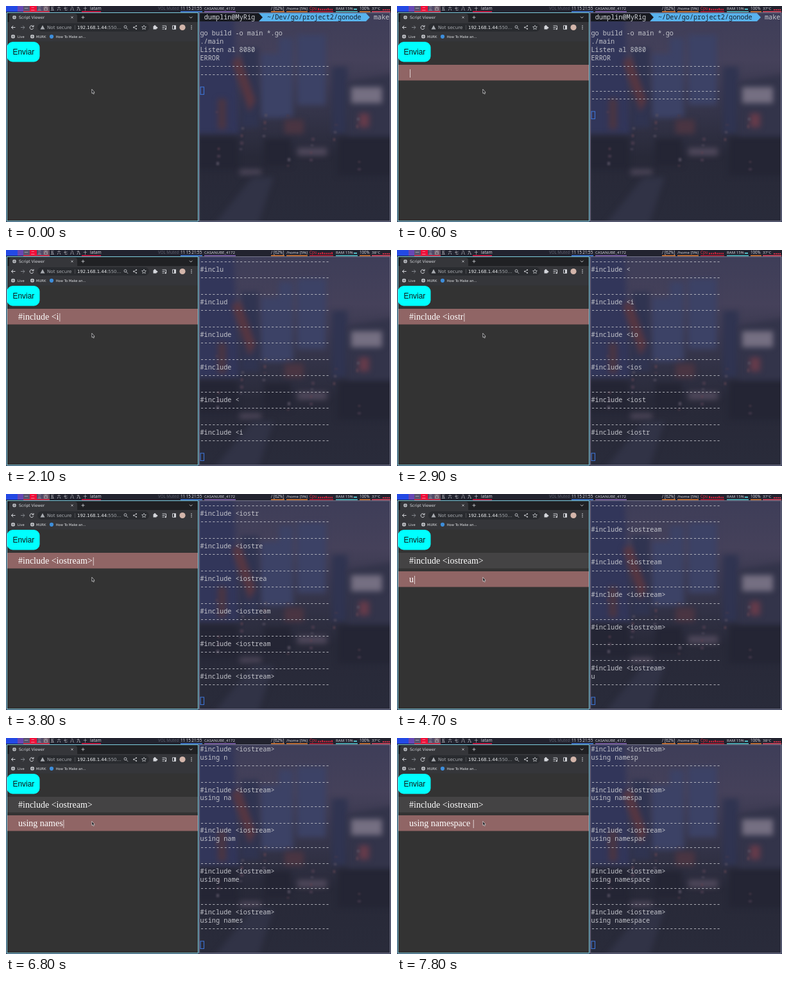
Write an HTML page with a canvas that moves like this. It is 600x338 px and loops after 8 s.

```html
<!DOCTYPE html>
<html lang="es">
<head>
<meta charset="utf-8">
<style>
html, body { margin: 0; width: 600px; height: 338px; overflow: hidden; background: #202124; }
canvas { display: block; }
</style>
</head>
<body>
<canvas id="stage" width="600" height="338"></canvas>
<script>
const LOOP = 8000, ROWS = 25, ROW_H = 12.75, LEFT = 302.5;
const MONO = '10.2px "Noto Sans Mono", "DejaVu Sans Mono", monospace';
const UI = '"DejaVu Sans", sans-serif';
const DASHES = '-'.repeat(33);
const ctx = document.getElementById('stage').getContext('2d');

// ---- drawing helpers ----
function box(x, y, w, h, color, c = ctx) {
  c.fillStyle = color;
  c.fillRect(x, y, w, h);
}
function frame(x, y, w, h, color) {
  ctx.strokeStyle = color;
  ctx.lineWidth = 1;
  ctx.strokeRect(x, y, w, h);
}
function pill(x, y, w, h, r, color) {
  ctx.fillStyle = color;
  ctx.beginPath();
  ctx.roundRect(x, y, w, h, r);
  ctx.fill();
}
function dot(x, y, r, color) {
  ctx.fillStyle = color;
  ctx.beginPath();
  ctx.arc(x, y, r, 0, 7);
  ctx.fill();
}
function text(str, x, y, font, color) {
  ctx.font = font;
  ctx.fillStyle = color;
  ctx.fillText(str, x, y);
}
function stroke(path, color, width = 1) {
  ctx.strokeStyle = color;
  ctx.lineWidth = width;
  ctx.stroke(new Path2D(path));
}
function shape(path, color, c = ctx) {
  c.fillStyle = color;
  c.fill(new Path2D(path));
}

// ---- typing script: '~' is a key that adds no character ----
const events = [];
let typed = '';
function press(start, step, keys) {
  [...keys].forEach((key, i) => {
    if (key !== '~') typed += key;
    events.push({ time: start + i * step, text: typed });
  });
}
press(500, 200, '~#in');
press(1300, 100, 'clude <i');
press(2250, 185, 'ostream~>');
press(4400, 0, '\n');
press(4700, 230, 'usin');
press(5550, 200, 'g names');
press(6950, 200, 'pace ');

function terminalRows(past) {
  const rows = ['PROMPT', '', 'go build -o main *.go', './main', 'Listen al 8080',
    'ERROR', DASHES, DASHES, ''];
  for (const e of past) {
    if (e.text.endsWith('\nusi')) rows.push('ERROR');
    rows.push(DASHES, ...(e.text ? e.text.split('\n') : []), DASHES, '');
  }
  return rows.slice(-(ROWS - 1));
}

// ---- blurred street at dusk ----
const scene = document.createElement('canvas');
scene.width = 300;
scene.height = 338;
{
  const c = scene.getContext('2d');
  const sky = c.createLinearGradient(0, 0, 0, 338);
  sky.addColorStop(0, '#3d3d58');
  sky.addColorStop(0.25, '#45415a');
  sky.addColorStop(0.5, '#343449');
  sky.addColorStop(0.7, '#282938');
  sky.addColorStop(1, '#292b3a');
  c.fillStyle = sky;
  c.fillRect(0, 0, 300, 338);
  c.filter = 'blur(4px)';
  const patches = [
    ['#32365a', 'M-9 0H52L62 200H-9z'],
    ['#3c4266', 'M95 75h28v-25h22v125h-50z M152 45h44v110h-44z'],
    ['#303451', 'M64 65H92V190H64z M206 95H230V200H206z'],
    ['#33344a', 'M230 118L310 105V210H230z'],
    ['#573641', 'M50 86l13 -6l24 68l-10 18z'],
    ['#4a3542', 'M28 145h13v48h-13z M132 178h30v22h-30z'],
    ['#653b4a', 'M248 168h16v22h-16z'],
    ['#756f82', 'M236 127h48v25h-48z'],
    ['#242534', 'M-9 205H60V255H-9z M100 208h42v42h-42z M215 205h95v60h-95z'],
    ['#4f485b', 'M152 222h46v12h-46z M62 256h34v8h-34z'],
    ['#313346', 'M20 345L82 268H115L90 345z']
  ];
  for (const [color, path] of patches) shape(path, color, c);
  c.filter = 'blur(1.5px)';
  for (let i = 0; i < 26; i++) {
    const x = 25 + i * 73 % 255, y = 165 + i * 37 % 90;
    box(x, y, 3 + i % 3, 2 + i % 4, ['#5b4250', '#534d5f', '#463a4c'][i % 3], c);
  }
}

function drawBar(t) {
  box(0, 0, 600, 10, '#22232f');
  const label = (str, x, color = '#d4d5dc', size = 6.2) => text(str, x, 5.6, `${size}px "Noto Sans", sans-serif`, color);
  const under = (x, w, color) => box(x, 8, w, 1.5, color);
  box(0, 0, 18, 9, '#2349e4');
  box(18, 0, 9, 9, '#6747b4');
  box(27, 0, 10, 9, '#59546f');
  box(37, 0, 11, 9, '#f10d38');
  box(48, 0, 10, 9, '#514b68');
  box(58, 0, 10, 9, '#62505f');
  [...'一二三四五六七八九十'].forEach((k, i) =>
    text(k, 28.5 + i * 10.2, 6.1, '6.1px "Noto Sans CJK JP", "Noto Sans CJK SC", sans-serif', '#e4e4ea'));
  label('latam', 131, '#d4d5dc', 6.6);
  under(27, 41, '#ef3150');
  under(118, 30, '#ed1746');
  label('VOL Muted', 237, '#5b5e6c');
  label('11 15 21:55', 272);
  under(272, 34, '#4586ed');
  label('CASANUBE_4172', 309, '#d4d5dc', 6.1);
  under(309, 49, '#8a67bd');
  label('/ [62%]', 413);
  under(413, 21, '#e78034');
  label('/home [5%]', 437, '#d4d5dc', 6.1);
  under(437, 33, '#e78034');
  label('Cpu', 473, '#e32c40');
  const tick = Math.floor(t / 900);
  for (let i = 0; i < 8; i++) {
    const high = (i * 7 + tick * 3) % 5 === 0 ? 1 : 0;
    box(486 + i * 3, 4.5 - high, 2, 2 + high, '#e3223d');
  }
  under(473, 37, '#c31f39');
  label('RAM 15%', 514, '#d4d5dc', 6.1);
  box(542, 4, 5, 2, '#54bfc9');
  under(514, 34, '#53c7cf');
  label('100%', 551);
  under(551, 17, '#e78034');
  const warm = t >= 900 && t < 2800 || t >= 7300;
  label(warm ? '38°C' : '37°C', 570, '#d4d5dc', 6.1);
  for (let i = 0; i < 4; i++) box(587 + i * 3, 5, 2, 1.7, '#ec2f4b');
  under(570, 29, '#ed4e68');
}

function drawBrowser(past) {
  box(1, 10, 298, 327, '#202124');
  pill(5, 12, 106, 16, [4, 4, 0, 0], '#35363a');
  box(1, 25, 298, 31, '#35363a');
  box(1, 55.5, 298, 281, '#333');

  const light = '#d5d7dc', dim = '#84878d';
  // tab
  dot(13, 17.8, 2.8, light);
  stroke('M10.5 17.8h5M13 15v5.6', '#35363a', 0.6);
  text('Script Viewer', 20, 20, '6.1px ' + UI, light);
  stroke('M101.5 16.3l3 3m0 -3l-3 3M117.5 17.8h5m-2.5 -2.5v5', light, 0.8);
  stroke('M286 16.7l2.2 2.2l2.2 -2.2', light, 0.9);

  // navigation and address
  stroke('M14.5 33.5h-6m2.7 -2.7l-2.7 2.7l2.7 2.7', light);
  stroke('M23 33.5h6m-2.7 -2.7l2.7 2.7l-2.7 2.7', dim);
  stroke('M42.4 32A2.9 2.9 0 1 0 42.8 34.4M43 30v2.5h-2.5', light);
  pill(49, 27, 174, 13, 6.5, '#292b2f');
  shape('M57 30l3.5 6.5h-7z', '#a9acb1');
  text('Not secure', 64, 36, '7.1px ' + UI, '#a9acb1');
  box(107, 30, 0.7, 7, '#5b5d62');
  text('192.168.1.44:', 111, 36, '6.9px ' + UI, '#eceef0');
  text('550…', 111 + ctx.measureText('192.168.1.44:').width, 36, '6.9px ' + UI, '#a4a7ac');
  stroke('M188 32.7a2 2 0 1 0 -4 0a2 2 0 1 0 4 0M187.4 34.2l2.6 2.6', light, 0.8);
  stroke('M199 33.5l4 -2.2M199 33.5l4 2.2', light, 0.7);
  [[199, 33.5], [203, 31.3], [203, 35.7]].forEach(p => dot(...p, 1, light));
  stroke('M215 30.2l1 2.2l2.4 .2l-1.8 1.6l.5 2.4l-2.1 -1.3l-2.1 1.3l.5 -2.4l-1.8 -1.6l2.4 -.2z', light, 0.7);
  box(229.5, 31.5, 5, 5, light);
  dot(232, 31.3, 1.3, light);
  dot(235, 34, 1.3, light);
  stroke('M243.5 31h6M243.5 33.5h4M243.5 36h3M249.5 31v5', light, 0.9);
  dot(248.7, 36, 1.2, light);
  stroke('M259.5 30.7h5v5.6h-5z', light, 0.9);
  box(262, 30.7, 2.5, 5.6, light);
  dot(275, 33.5, 4.6, '#d3b5aa');
  [31, 33.5, 36].forEach(y => dot(289, y, 0.8, light));

  // bookmarks
  const mark = (str, x) => text(str, x, 49.8, '5.2px ' + UI, '#e2e4e7');
  for (const x of [11, 41]) {
    dot(x, 47.8, 3, light);
    stroke(`M${x - 2.5} 47.8h5m-2.5 -2.8v5.6`, '#35363a', 0.6);
  }
  dot(71, 47.8, 3.1, '#3d8edb');
  mark('Live', 18);
  mark('MURK', 47);
  mark('How To Make an...', 77.7);

  // page
  pill(1.5, 56, 51, 31.5, 9, '#0ff');
  text('Enviar', 10.5, 76.2, '11.9px "Liberation Sans", Arial, sans-serif', '#101515');
  if (past.length) {
    const lines = past[past.length - 1].text.split('\n');
    lines.forEach((line, i) => {
      const y = 92 + i * 29, active = i === lines.length - 1;
      box(1, y, 298, 24.5, active ? '#906565' : '#444344');
      text(line + (active ? '|' : ''), 19, y + 16.8, '14px "Liberation Serif", "Times New Roman", serif', '#fff');
    });
  }
  frame(1.5, 10.5, 298, 326, '#7fd0e0');
  const arrow = 'M133.8 130.2v6.4l1.3 -1l1 2.2l1.3 -.6l-.9 -2h1.6z';
  shape(arrow, '#15161a');
  stroke(arrow, '#e2e2e2', 0.7);
}

function drawPrompt(y) {
  const top = y - 6.4, end = y + 6.4;
  box(302, top, 93, 12.8, '#17191f');
  shape(`M393 ${top}H561L567 ${y}L561 ${end}H393z`, '#58b3ee');
  shape(`M392 ${top}h2l6 6.4l-6 6.4h-2z`, '#17191f');
  text('dumplin@MyRig', 308.7, y + 3.2, MONO, '#d3d5da');
  text('~/Dev/go/project2/gonode', 407, y + 3.2, MONO, '#17202b');
  text('make', 573, y + 3.2, MONO, '#c9cad0');
}

function drawTerminal(past) {
  ctx.drawImage(scene, 0, 10, 297, 327, 302, 10, 297, 327);
  const rows = terminalRows(past);
  rows.forEach((row, i) => {
    const y = 17.7 + i * ROW_H;
    if (row === 'PROMPT') drawPrompt(y);
    else text(row, LEFT, y + 3.1, MONO, '#c2c3ca');
  });
  frame(303, 17.7 + rows.length * ROW_H - 5.7, 5.5, 11.6, '#3e78de');
  frame(301.5, 10.5, 297, 326, '#77788e');
}

const origin = performance.now();
function draw() {
  const t = (performance.now() - origin) % LOOP;
  const past = events.filter(e => e.time <= t);
  box(0, 0, 600, 338, '#3a3f58');
  drawBar(t);
  drawTerminal(past);
  drawBrowser(past);
  requestAnimationFrame(draw);
}
draw();
</script>
</body>
</html>
```
